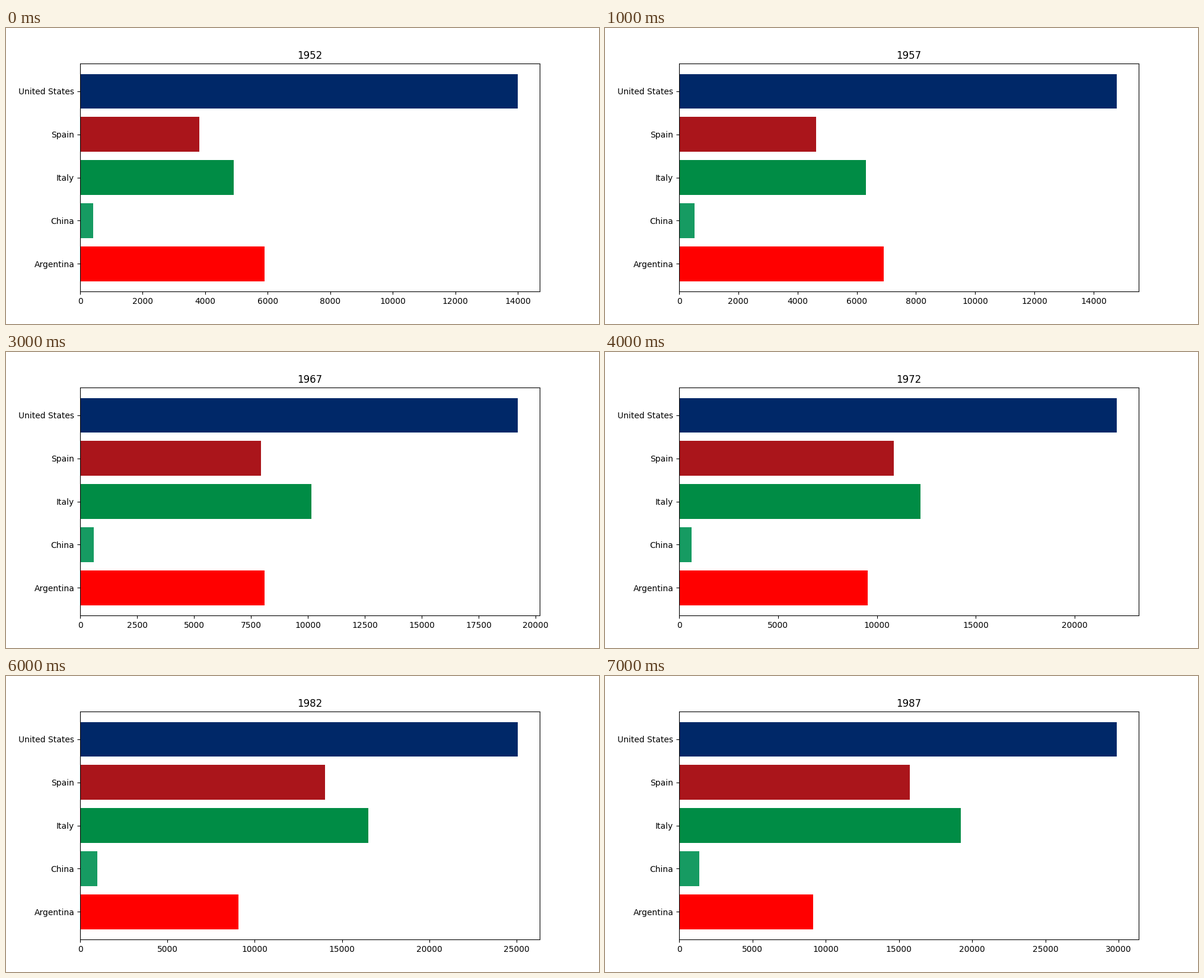
Recreate the animation shown at these times as a matplotlib script. Size 1000 by 500 pixels, loop 8 s.

```python
import matplotlib.pyplot as plt
from matplotlib.animation import FuncAnimation
from numpy.polynomial import Polynomial

START_YEAR, YEAR_STEP, STEPS = 1952, 5, 8

# Each country: bar colour and its growth curve over time u in [-1, 1],
# given as level, slope, bend and higher terms.
TRENDS = {
    "Argentina": ("#ff0000", Polynomial([8850, 5193, -2055, -11041, 718, 7464])),
    "China": ("#169b62", Polynomial([609, 159, 281, 320])),
    "Italy": ("#008c45", Polynomial([11167, 7150, 65, 0, 832])),
    "Spain": ("#aa151b", Polynomial([9413, 10338, -724, -10441, 1094, 6066])),
    "United States": ("#002868",
                      Polynomial([20761, 10378, -4549, -10163, 5725, 7721])),
}

fig, ax = plt.subplots(figsize=(10, 5), dpi=100)


def draw(step):
    """Redraw the chart; the axis rescales to the longest bar."""
    u = 2 * step / (STEPS - 1) - 1
    ax.clear()
    for country, (color, trend) in TRENDS.items():
        ax.barh(country, trend(u), color=color)
    ax.set_title(str(START_YEAR + YEAR_STEP * step))


anim = FuncAnimation(fig, draw, frames=STEPS, init_func=lambda: draw(0),
                     interval=1000, repeat=True, repeat_delay=0)
plt.show()
```
